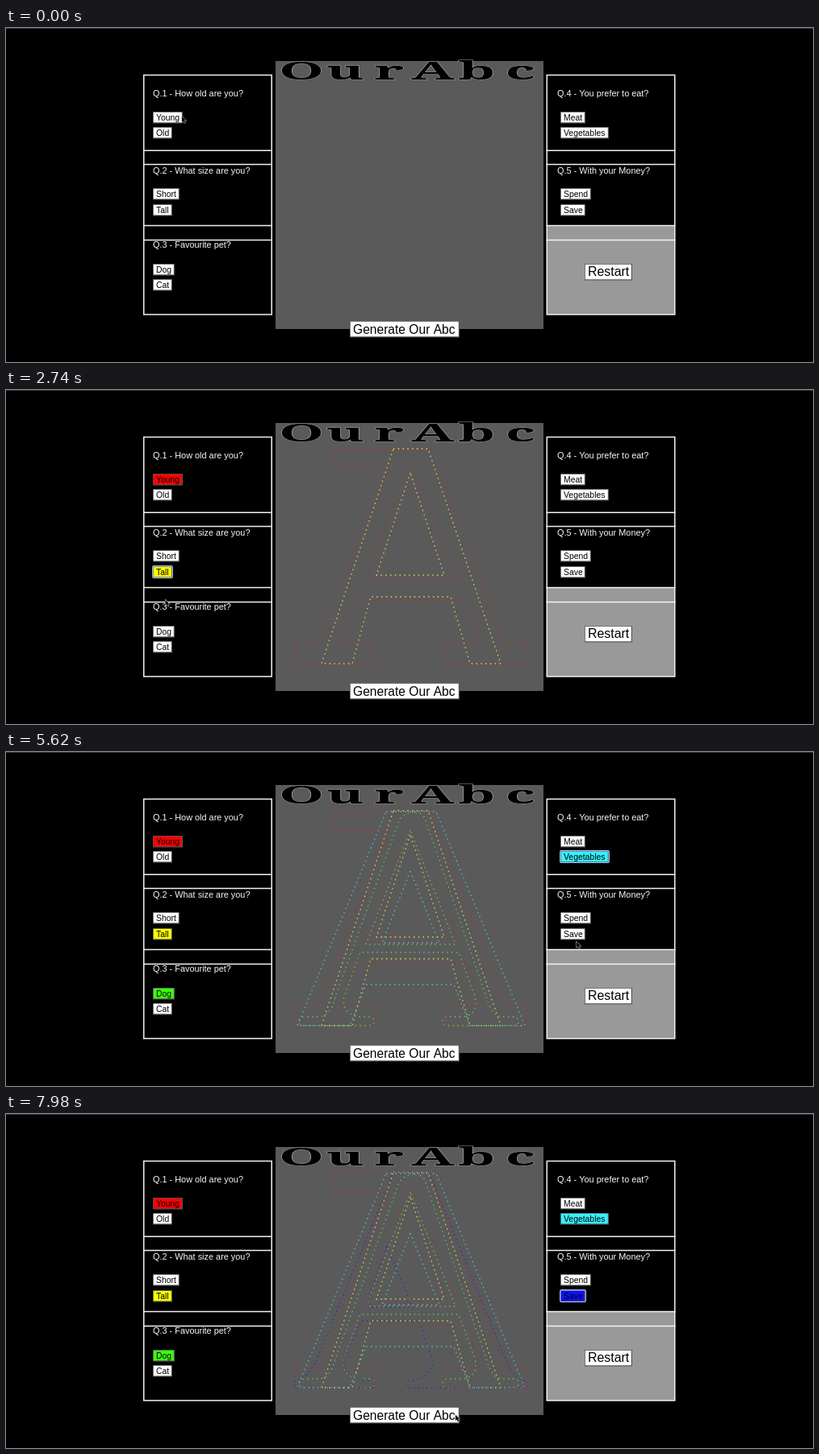
An HTML page with a canvas for the animation above (8000 ms loop, 1000 by 415 pixels).

```html
<!DOCTYPE html>
<html lang="en">
<head>
<meta charset="utf-8">
<title>Letter quiz</title>
<style>
  html, body { margin: 0; width: 100%; height: 100%; overflow: hidden; background: #000; }
  canvas { display: block; }
</style>
</head>
<body>
<canvas id="stage" width="1000" height="415"></canvas>
<script>
const ctx = document.getElementById('stage').getContext('2d');
const LOOP = 8000;
const SANS = '"Liberation Sans", Arial, sans-serif';

// Answers: click time, button index, button colour, dot colour, dash, outline
const answers = [
  { at: 400, button: 0, fill: '#f80000', dots: '#a63434', dash: [1.6, 3.6], outline:
    'M405 73H525L619 315H645V341H545V315H589L570 262H434L415 315H457V341H358V315H387L474 98H405Z' +
    'M501 91L445 236H560Z' },
  { at: 2000, button: 3, fill: '#ffff00', dots: '#eadf40', dash: [1.4, 4.4], outline:
    'M480 73H523L613 340H575L551 257H452L429 340H391Z M501 103L459 230H543Z' },
  { at: 3480, button: 4, fill: '#3cff12', dots: '#5cce50', dash: [1.4, 4.4], outline:
    'M505 75Q489 76 485 91L408 304Q403 329 386 329H370Q363 329 363 335Q363 340 370 340H449' +
    'Q456 340 456 335Q456 329 449 329H436Q415 324 419 304L439 249H561L581 304Q586 329 563 329H548' +
    'Q541 329 541 335Q541 340 548 340H628Q635 340 635 335Q635 329 628 329H615Q602 329 595 304L520 85' +
    'Q517 75 505 75Z M501 97L446 239H557Z' },
  { at: 5000, button: 7, fill: '#35f2ff', dots: '#4ccbd6', dash: [1.4, 4.4], outline:
    'M471 74H533L643 340H575L555 289H446L426 340H361Z M501 148L466 237H537Z' },
  { at: 5960, button: 9, fill: '#1010ff', dots: '#3030b4', dash: [1.6, 3.9], outline:
    'M480 74H525L618 302Q628 330 647 332V340H498V332Q532 328 528 303L511 257H440L420 303' +
    'Q413 328 456 332V340H358V332Q375 328 386 303Z M472 165L445 240H504Z' }
];
for (const a of answers) a.path = new Path2D(a.outline);

// Label, x, y, width
const buttons = [
  ['Young', 182, 104, 37], ['Old', 182, 123, 24],
  ['Short', 182, 199, 33], ['Tall', 182, 219, 24],
  ['Dog', 182, 293, 27], ['Cat', 182, 312, 24],
  ['Meat', 687, 104, 31], ['Vegetables', 687, 123, 60],
  ['Spend', 687, 199, 38], ['Save', 687, 219, 31]
];

const questions = [
  ['Q.1 - How old are you?', 182, 85],
  ['Q.2 - What size are you?', 182, 181],
  ['Q.3 - Favourite pet?', 182, 273],
  ['Q.4 - You prefer to eat?', 683, 85],
  ['Q.5 - With your Money?', 683, 181]
];

// Pointer stops: time, x, y
const stops = [
  [0, 218, 110], [300, 212, 110], [620, 212, 110], [1240, 207, 209],
  [1440, 207, 210], [1800, 197, 226], [2350, 197, 226], [3150, 198, 298],
  [3900, 198, 298], [4480, 698, 126], [5180, 698, 126], [5560, 707, 236],
  [5640, 707, 236], [5820, 706, 228], [6100, 706, 228], [6580, 645, 357],
  [7120, 632, 363], [7440, 588, 374], [7800, 557, 374], [LOOP, 557, 374]
];

function pointerAt(t) {
  const i = Math.max(1, stops.findIndex(s => s[0] > t));
  const [t0, x0, y0] = stops[i - 1];
  const [t1, x1, y1] = stops[i];
  const u = (t - t0) / (t1 - t0);
  const k = u * u * (3 - 2 * u);
  return [x0 + (x1 - x0) * k, y0 + (y1 - y0) * k];
}

function text(label, x, y, size, color) {
  ctx.font = `${size}px ${SANS}`;
  ctx.fillStyle = color;
  ctx.fillText(label, x, y);
}

function drawButton(label, x, y, w, h, size, baseline, fill = '#fff') {
  ctx.fillStyle = '#555';
  ctx.fillRect(x, y, w, h + 0.5);
  ctx.fillStyle = fill;
  ctx.fillRect(x + 0.8, y + 0.8, w - 2, h - 1.5);
  text(label, x + 4, y + baseline, size, '#000');
}

function drawPanel(x) {
  ctx.strokeStyle = '#f2f2f2';
  ctx.lineWidth = 1.5;
  ctx.strokeRect(x + 0.75, 58.5, 158.5, 297.5);
  ctx.beginPath();
  for (const y of [152.3, 169.5, 245.5, 263.5]) {
    ctx.moveTo(x, y);
    ctx.lineTo(x + 160, y);
  }
  ctx.stroke();
}

function drawTitle() {
  ctx.font = 'bold 31px "Noto Serif", serif';
  ctx.textAlign = 'center';
  ctx.lineWidth = 0.8;
  ctx.strokeStyle = '#999';
  ctx.fillStyle = '#000';
  [...'OurAbc'].forEach((letter, i) => {
    ctx.save();
    ctx.translate(366 + i * 54.3, 64);
    ctx.scale(2.3, 1);
    ctx.strokeText(letter, 0, 0);
    ctx.fillText(letter, 0, 0);
    ctx.restore();
  });
  ctx.textAlign = 'left';
}

function drawPointer(x, y) {
  ctx.save();
  ctx.translate(x, y);
  ctx.scale(0.85, 0.85);
  ctx.beginPath();
  ctx.moveTo(0, 0);
  for (const [px, py] of [[0, 8], [2, 6.4], [3.5, 9.6], [4.9, 9], [3.5, 5.9], [6, 5.7]]) ctx.lineTo(px, py);
  ctx.closePath();
  ctx.lineWidth = 1.2;
  ctx.strokeStyle = '#ccc';
  ctx.stroke();
  ctx.fillStyle = '#000';
  ctx.fill();
  ctx.restore();
}

function draw(t) {
  ctx.fillStyle = '#000';
  ctx.fillRect(0, 0, 1000, 415);
  ctx.fillStyle = '#333';
  ctx.fillRect(0, 0, 1000, 1);
  ctx.fillStyle = '#5a5a5a';
  ctx.fillRect(334, 41, 332, 333);
  ctx.fillStyle = '#999';
  ctx.fillRect(670, 245, 159, 111);
  drawPanel(170);
  drawPanel(669.5);
  drawTitle();

  const given = answers.filter(a => t >= a.at);
  for (const a of given) {
    ctx.lineWidth = 1.3;
    ctx.strokeStyle = a.dots;
    ctx.setLineDash(a.dash);
    ctx.stroke(a.path);
  }
  ctx.setLineDash([]);

  for (const [label, x, y] of questions) text(label, x, y, 10.9, '#f8f8f8');
  buttons.forEach(([label, x, y, w], i) => {
    const chosen = given.find(a => a.button === i);
    drawButton(label, x, y, w, 14, 10.4, 11, chosen && chosen.fill);
  });
  drawButton('Restart', 717, 293, 59, 20, 15.9, 15);
  drawButton('Generate Our Abc', 426, 364, 136, 20, 15.6, 15.5);

  const latest = given[given.length - 1];
  if (latest) {
    const [, x, y, w] = buttons[latest.button];
    ctx.strokeStyle = '#a9c8ff';
    ctx.lineWidth = 1.2;
    ctx.beginPath();
    ctx.roundRect(x - 0.3, y - 0.3, w + 0.6, 14.8, 1.5);
    ctx.stroke();
  }
  drawPointer(...pointerAt(t));
}

function tick() {
  draw(performance.now() % LOOP);
  requestAnimationFrame(tick);
}
tick();
</script>
</body>
</html>
```
